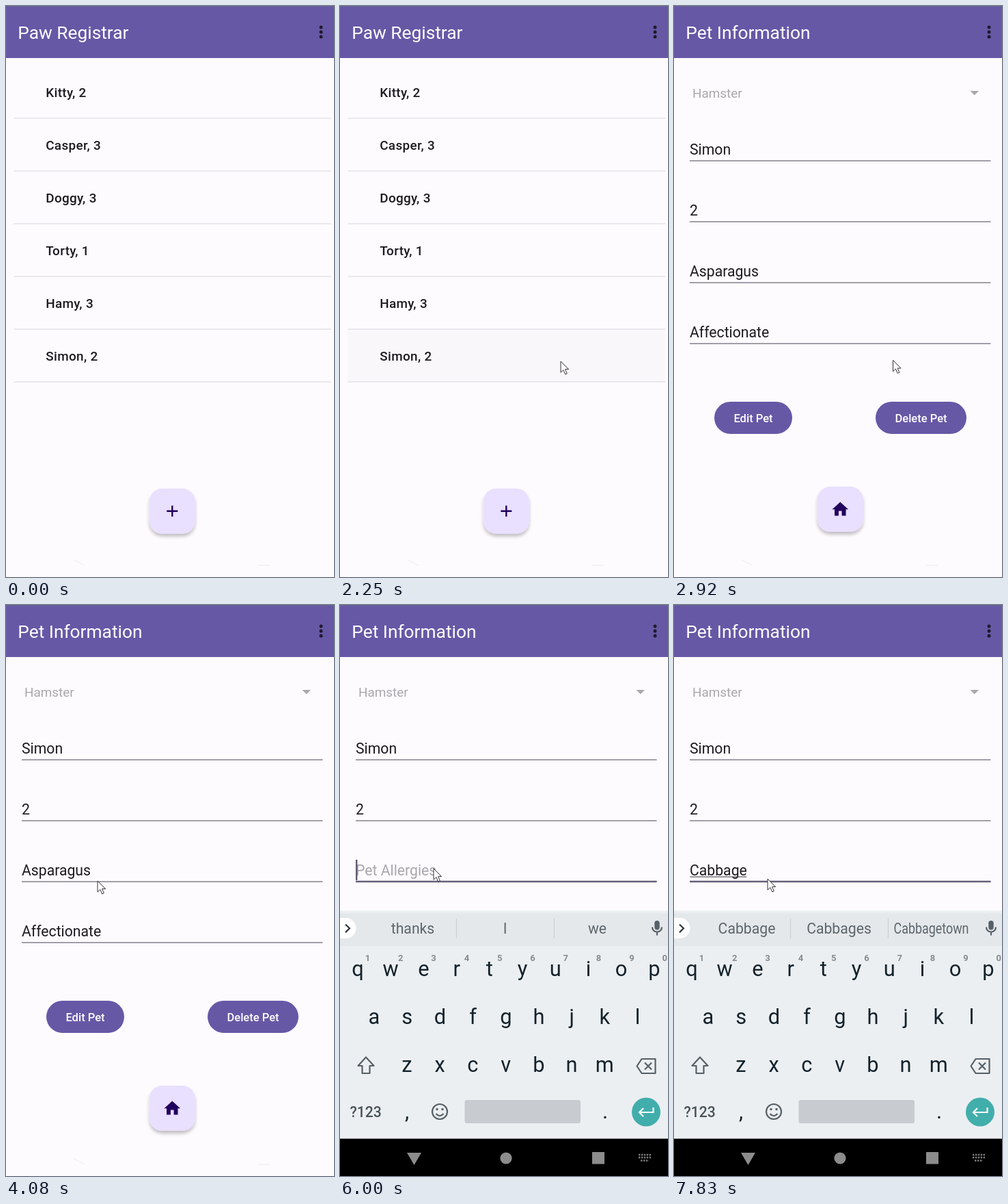
Recreate the animation shown at these times as an HTML page. Size 480 by 834 pixels, loop 8 s.

```html
<!DOCTYPE html>
<html lang="en">
<head>
<meta charset="utf-8">
<title>Pet list</title>
<style>
  html, body { margin: 0; width: 100%; height: 100%; overflow: hidden; background: #fefbff; }
  svg { display: block; width: 480px; height: 834px; }
  text { font-family: Roboto, sans-serif; white-space: pre; }
  .title { font-size: 26.3px; fill: #fff; }
  .row { font-size: 18.9px; font-weight: 500; letter-spacing: .35px; fill: #1c1b1f; }
  .field { font-size: 21.2px; fill: #1c1b1f; }
  .type { font-size: 18.9px; fill: #a9a7ab; }
  .btn { font-size: 16.5px; font-weight: 500; fill: #fff; }
  .btn, .mid { text-anchor: middle; }
  .key { font-size: 30.8px; fill: #13222c; }
  .digit { font-size: 13px; font-weight: 700; fill: #858b90; }
  .sym { font-size: 21.2px; font-weight: 500; fill: #48535a; }
  .tip { font-size: 21.2px; fill: #5d666c; }
  .line { fill: none; stroke: #566067; stroke-width: 2.2; }
</style>
</head>
<body>
<svg viewBox="0 0 480 834">
  <defs>
    <clipPath id="rowClip"><rect x="11.5" y="472" width="464.5" height="77"/></clipPath>
    <clipPath id="reveal"><rect id="revealBox" width="480" height="834"/></clipPath>
    <filter id="shadow" x="-30%" y="-30%" width="160%" height="170%">
      <feDropShadow dx="0" dy="4" stdDeviation="2.6" flood-color="#000" flood-opacity=".24"/>
    </filter>
    <linearGradient id="edge" x2="0" y2="1">
      <stop offset="0" stop-color="#f3f3f6"/><stop offset="1" stop-color="#e4e8ea"/>
    </linearGradient>
    <g id="bar">
      <rect width="480" height="76" fill="#6758a6"/>
      <rect width="480" height="1" fill="#6c6690"/>
      <g fill="#1f1b2b">
        <circle cx="461" cy="31" r="2.5"/><circle cx="461" cy="38" r="2.5"/><circle cx="461" cy="45" r="2.5"/>
      </g>
    </g>
    <rect id="fab" x="-33.5" y="-33" width="67" height="66" rx="19" fill="#e9dfff" filter="url(#shadow)"/>
  </defs>

  <rect width="480" height="834" fill="#fefbff"/>

  <g id="listPage">
    <rect width="480" height="834" fill="#fefbff"/>
    <use href="#bar"/>
    <text class="title" x="17.3" y="48">Paw Registrar</text>
    <circle id="ripple" cx="243.2" cy="510.5" fill="#e9e4e8" clip-path="url(#rowClip)"/>
    <g id="rows"></g>
    <g transform="translate(243.3 737.8)">
      <use href="#fab"/>
      <path d="M-8 0H8M0-8V8" stroke="#21005d" stroke-width="2.4"/>
    </g>
    <rect id="dim" width="480" height="850"/>
  </g>

  <g clip-path="url(#reveal)">
    <g id="petPage">
      <rect width="480" height="834" fill="#fefbff"/>
      <use href="#bar"/>
      <text class="title" x="17.3" y="48">Pet Information</text>
      <text class="type" x="27" y="134">Hamster</text>
      <path d="M433.5 124h12.5l-6.2 6.3z" fill="#a9a7ab"/>
      <g id="fields"></g>
      <g id="buttons"></g>
      <g transform="translate(243.3 735)">
        <use href="#fab"/>
        <path transform="translate(-14.2 -14) scale(1.18)" d="M10 20v-6h4v6h5v-8h3L12 3 2 12h3v8z" fill="#21005d"/>
      </g>
    </g>
  </g>

  <g id="edit">
    <rect id="compose" x="23.5" y="396.5" height="1.1" fill="#47454c"/>
    <rect x="23" y="402.7" width="440.5" height="2.5" fill="#665f78"/>
    <rect id="caret" y="372" width="2.4" height="30" fill="#625b71"/>
    <path id="handle" d="M0-14.5L8.3-8.3A11.7 11.7 0 1 1-8.3-8.3Z" fill="#655d75"/>
  </g>

  <path d="M99.5 809l15.5 8M369.5 817h16.5" fill="none" stroke="#f1eff2" stroke-width="1.4"/>

  <g id="board">
    <rect y="446" width="480" height="334" fill="#eceff1"/>
    <rect y="446" width="480" height="52" fill="#e4e8ea"/>
    <rect y="446" width="480" height="6" fill="url(#edge)"/>
    <rect x="-20" y="457" width="43.5" height="30" rx="15" fill="#fff"/>
    <path class="line" d="M8 466.5l6 5.8-6 5.8" style="stroke:#2d363c"/>
    <path id="bars" d="M170.5 458v29M313.5 458v29" stroke="#cdd2d5" stroke-width="1.3"/>
    <g id="tips"></g>
    <rect x="460.3" y="461" width="7.4" height="13.5" rx="3.7" fill="#566067"/>
    <path class="line" d="M457 470.5a7 7 0 0 0 14 0M464 477.5v5"/>
    <g id="keys"></g>
    <path class="line" d="M38 660.5L26.5 673h6v11h11v-11h6z" stroke-linejoin="round"/>
    <path class="line" d="M434.5 673.5l7-10.5h20v21h-20zM446 668.5l10 10M456 668.5l-10 10" stroke-linejoin="round"/>
    <text class="sym mid" x="37.7" y="747.5">?123</text>
    <circle class="line" cx="146" cy="740" r="11"/>
    <path class="line" d="M140.5 743q5.5 6.5 11 0"/>
    <circle cx="142" cy="736.5" r="1.7" fill="#566067"/><circle cx="150" cy="736.5" r="1.7" fill="#566067"/>
    <rect x="182.5" y="723" width="169.5" height="34" rx="3" fill="#c8ccd0"/>
    <circle cx="448" cy="740.5" r="21" fill="#41aeac"/>
    <path class="line" d="M458.5 734v7h-20M444 735l-6 6 6 6" style="stroke:#fff"/>
    <rect y="779.5" width="480" height="80"/>
  </g>
  <g id="nav" fill="#8c8c8c">
    <path d="M98 800h21l-10.5 18z"/><circle cx="243" cy="808" r="8.6"/><rect x="369" y="799" width="18" height="17.5"/>
    <path d="M437 803h18M437 807h18M440 811.5h12" stroke="#7d7d7d" stroke-width="2.4" stroke-dasharray="2.4 1.5"/>
  </g>

  <path id="mouse" d="M0 0V16.2L3.9 12.6 6.7 19 9.3 17.9 6.6 11.6H11.6Z" fill="#fff" stroke="#333" stroke-width="1"/>
</svg>

<script>
const LOOP = 8000;
const $ = id => document.getElementById(id);

function add(parent, tag, attrs, text) {
  const el = document.createElementNS('http://www.w3.org/2000/svg', tag);
  for (const k in attrs) el.setAttribute(k, attrs[k]);
  if (text) el.textContent = text;
  return $(parent).appendChild(el);
}
const set = (id, name, v) => $(id).setAttribute(name, v);
const show = (id, on) => set(id, 'visibility', on ? 'visible' : 'hidden');
const move = (id, x, y) => set(id, 'transform', `translate(${x} ${y})`);
const part = (t, a, b) => Math.min(1, Math.max(0, (t - a) / (b - a)));
const smooth = p => p * p * (3 - 2 * p);

// y on a cubic Bezier at a given x; each point is [x, y]
function bezier(x, a, b, c, d) {
  const at = (s, i) => (1 - s) ** 3 * a[i] + 3 * s * (1 - s) ** 2 * b[i] + 3 * s * s * (1 - s) * c[i] + s ** 3 * d[i];
  let lo = 0, hi = 1;
  for (let i = 0; i < 24; i++) {
    const m = (lo + hi) / 2;
    if (at(m, 0) < x) lo = m; else hi = m;
  }
  return at(lo, 1);
}
const slide = p => bezier(p, [0, 0], [.4, 0], [.2, 1], [1, 1]);
const unveil = p => p < 1 / 6
  ? bezier(p, [0, 0], [.05, 0], [.1333, .06], [1 / 6, .4])
  : bezier(p, [1 / 6, .4], [.2083, .82], [.25, 1], [1, 1]);

['Kitty, 2', 'Casper, 3', 'Doggy, 3', 'Torty, 1', 'Hamy, 3', 'Simon, 2'].forEach((name, i) => {
  add('rows', 'text', { class: 'row', x: 58.2, y: 132.8 + 77 * i }, name);
  add('rows', 'rect', { x: 11.5, y: 163.3 + 77 * i, width: 464.5, height: 1.4, fill: '#e4e0e7' });
});

const fields = ['Simon', '2', 'Asparagus', 'Affectionate'].map((value, i) => {
  add('fields', 'rect', { x: 23, y: 225.4 + 89 * i, width: 440.5, height: 1.4, fill: '#7d7882' });
  return add('fields', 'text', { class: 'field', x: 23, y: 217.3 + 88.8 * i }, value);
});
const input = fields[2];

[['Edit Pet', 59, 114], ['Delete Pet', 295, 133]].forEach(([label, x, w]) => {
  add('buttons', 'rect', { x, y: 578, width: w, height: 47, rx: 23.5, fill: '#6758a6' });
  add('buttons', 'text', { class: 'btn', x: x + w / 2, y: 608 }, label);
});

[['qwertyuiop', 26, 542], ['asdfghjkl', 50, 612], ['zxcvbnm', 98, 682]].forEach(([letters, x, y], row) => {
  [...letters].forEach((c, i) => {
    add('keys', 'text', { class: 'key mid', x: x + 48.2 * i, y }, c);
    if (!row) add('keys', 'text', { class: 'digit mid', x: 40.5 + 48.3 * i, y: 519.5 }, String((i + 1) % 10));
  });
});
add('keys', 'text', { class: 'key mid', x: 98, y: 750 }, ',');
add('keys', 'text', { class: 'key mid', x: 388, y: 750 }, '.');

const tips = [106.5, 241.5, 376.5].map(x => {
  const el = add('tips', 'text', { class: 'tip mid', y: 480 });
  el.dataset.x = x;
  return el;
});
const guesses = {
  '': 'thanks I we', C: 'C Can Could', Ca: 'Ca Can Call', Cab: 'Cab Can Cabin',
  Cabb: 'Cabb Cabbage Cabby', Cabba: 'Cabba Cabbage Cabbages', Cabbag: 'Cabbag Cabbage Cabbages',
  Cabbage: 'Cabbage Cabbages Cabbagetown'
};

const OPEN = 2269, FOCUS = 4580, BOARD = 4830;
const ERASE = 5280, ERASE_STEP = 80, TYPE = 6300, TYPE_STEP = 165;
const before = 'Asparagus', after = 'Cabbage';

// value of the edited field and the moment of the latest edit
function typing(t) {
  if (t >= TYPE) {
    const n = Math.min(after.length, Math.floor((t - TYPE) / TYPE_STEP) + 1);
    return [after.slice(0, n), TYPE + (n - 1) * TYPE_STEP];
  }
  if (t >= ERASE) {
    const n = Math.min(before.length, Math.floor((t - ERASE) / ERASE_STEP) + 1);
    return [before.slice(0, before.length - n), ERASE + (n - 1) * ERASE_STEP];
  }
  return [before, FOCUS];
}

const path = [[1000, 348, 546], [1400, 323, 519], [2850, 323, 519], [3900, 134, 403],
  [4150, 134, 403], [4450, 137, 385], [7560, 137, 385], [7760, 137, 400], [LOOP, 137, 400]];

function drawMouse(t) {
  show('mouse', t >= path[0][0]);
  const i = path.findIndex(p => p[0] > t);
  if (i < 1) return;
  const [a, x, y] = path[i - 1], [b, u, v] = path[i];
  const e = smooth(part(t, a, b));
  move('mouse', x + (u - x) * e, y + (v - y) * e);
}

function drawPages(t) {
  const p = part(t, OPEN, OPEN + 425), e = slide(p);
  move('listPage', 0, -16.5 * e);
  set('dim', 'opacity', .105 * part(p, 0, .3));
  move('petPage', 0, 38 * (1 - e));
  const top = p ? 834 * (1 - unveil(p)) : 834;
  set('revealBox', 'y', top);
  set('revealBox', 'height', 834 - top);

  show('ripple', t >= 1830);
  set('ripple', 'r', 159 + 77 * part(t, 1830, 1950));
  set('ripple', 'opacity', 1 - part(t, 2020, 2300));
}

function drawField(t) {
  const [word, edited] = typing(t);
  const focus = t >= FOCUS;
  input.textContent = word || 'Pet Allergies';
  input.style.fill = word ? '' : '#aaa7ac';
  const w = word ? input.getComputedTextLength() : 0;
  show('edit', focus);
  show('compose', focus && t >= BOARD && word);
  set('compose', 'width', Math.max(0, w - 1));
  show('caret', focus && (t - edited) % 1000 < 500);
  set('caret', 'x', 23 + w);
  show('handle', focus && t < ERASE);
  move('handle', 24.5 + w, 417);
  return word;
}

function drawBoard(t, word) {
  const p = part(t, BOARD, BOARD + 170), e = 1 - (1 - p) ** 2;
  show('board', p > 0);
  set('board', 'opacity', e);
  move('board', 0, 80 * (1 - e));
  set('nav', 'opacity', e);

  const words = t >= ERASE && word in guesses ? guesses[word].split(' ') : ['', word, ''];
  set('bars', 'opacity', words[0] ? 1 : 0);
  tips.forEach((el, i) => {
    el.textContent = words[i];
    // long suggestions are set condensed
    const k = words[i].length > 10 ? .845 : 1;
    el.setAttribute('transform', `translate(${el.dataset.x} 0) scale(${k} 1)`);
  });
}

function draw(t) {
  drawPages(t);
  drawBoard(t, drawField(t));
  drawMouse(t);
}

const start = performance.now();
function tick() {
  draw((performance.now() - start) % LOOP);
  requestAnimationFrame(tick);
}
tick();
</script>
</body>
</html>
```
